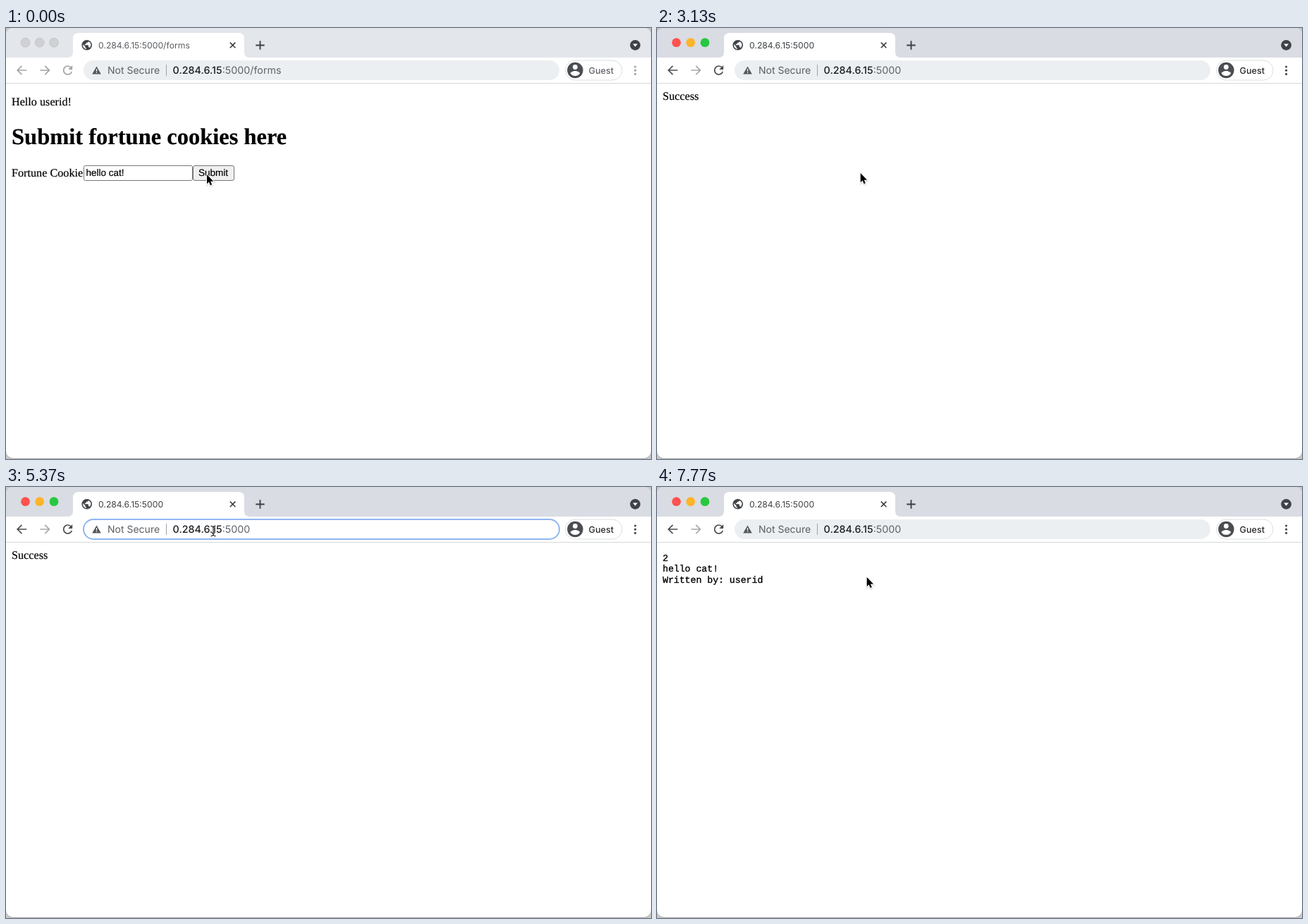
Animation, 915 px wide and 612 px high, one loop 8000 ms. Source, as an HTML page:

```html
<!DOCTYPE html>
<html lang="en">
<head>
<meta charset="utf-8">
<title>Fortune form</title>
<style>
  html, body { margin: 0; width: 100%; height: 100%; overflow: hidden; background: #c8c8c8; }
  svg {
    display: block; width: 915px; height: 612px;
    --strip: #d9dce3; --ink: #4a4d51; --label: #26282b; --title: #3c4043;
    --red: #ff524f; --yellow: #feb429; --green: #27c840; --rim: none;
  }
  svg.inactive {
    --strip: #e3e6eb; --ink: #a2a4a7; --label: #5f6368; --title: #5a5d61;
    --red: #cfd0d3; --yellow: #cfd0d3; --green: #cfd0d3; --rim: #bfc0c3;
  }
  text { white-space: pre; text-rendering: geometricPrecision; }
  .ui { font: 14px Inter, Roboto, sans-serif; }
  .small { font-size: 12.2px; }
  .url { font-size: 14.3px; }
  .guest { font-size: 12.6px; font-weight: 500; }
  .page { font: 16.2px "Liberation Serif", serif; }
  .page text { stroke: #000; stroke-width: .2; }
  .page .heading { font-size: 32.5px; font-weight: bold; }
  .page .control { font: 13.5px "Liberation Sans", sans-serif; }
  .mono { font: 13.18px "Liberation Mono", monospace; stroke: #000; stroke-width: .35; }
  .icon { fill: none; stroke: var(--ink); stroke-width: 1.7; }
</style>
</head>
<body>
<svg id="stage" viewBox="0 0 915 612">
  <defs>
    <clipPath id="corners"><rect width="915" height="611" rx="10"/></clipPath>
    <path id="arrowShape" d="M0 0V13.2L2.9 10.5L4.9 15.2L7.1 14.3L5.1 9.7H9.3Z"/>
    <path id="beamShape" d="M-3.5 -7.2Q0 -7.2 0 -5.2Q0 -7.2 3.5 -7.2M0 -5.5V5.5M-3.5 7.2Q0 7.2 0 5.2Q0 7.2 3.5 7.2M-2 3H2"/>
  </defs>
  <rect width="915" height="612" fill="#c8c8c8"/>
  <rect y="590" width="915" height="22" rx="10" fill="#a6a6a6"/>

  <g clip-path="url(#corners)">
    <rect width="915" height="612" fill="#fff"/>
    <rect width="915" height="42" fill="var(--strip)"/>

    <!-- Tab strip -->
    <g stroke="var(--rim)" stroke-width=".8">
      <circle cx="27.5" cy="20.7" r="6.4" fill="var(--red)"/>
      <circle cx="47.7" cy="20.7" r="6.4" fill="var(--yellow)"/>
      <circle cx="68" cy="20.7" r="6.4" fill="var(--green)"/>
    </g>
    <path d="M87 42Q95 42 95 34V15Q95 7 103 7H330Q338 7 338 15V34Q338 42 346 42Z" fill="#fff"/>
    <g id="globe" transform="translate(114.7 24.3)">
      <circle r="7.3" fill="#3f4347"/>
      <path d="M-5.8 -1.2L-2.2 2.2V3.6L-.8 4.4V5.8Q-5.6 5.2 -5.8 -1.2ZM2.2 -5.4Q2.2 -3.6 .7 -3.6H-.7V-2.2L-1.5 -1.5H-2.9V0H1.5L2.2 .7V2.9H2.9Q4 2.9 4.3 3.9Q8 -2.6 2.2 -5.4Z" fill="#fff"/>
    </g>
    <circle id="spinner" r="6.3" fill="none" stroke="#6b7075" stroke-width="1.8" stroke-dasharray="26 14"/>
    <text id="title" class="ui small" x="131" y="28.5" fill="var(--title)"></text>
    <path d="M317.8 20.6l7.6 7.6m0-7.6l-7.6 7.6" stroke="#3c4043" stroke-width="1.6"/>
    <path d="M354.3 24.5h12.4m-6.2-6.2v12.4" stroke="#3c4043" stroke-width="1.9"/>
    <circle cx="892.6" cy="24.4" r="7.3" fill="#3f4347"/>
    <path d="M889.2 22.6h6.8l-3.4 4.2z" fill="#fff"/>

    <!-- Toolbar -->
    <path class="icon" d="M29.2 60H16.6M22.4 53.8L16.2 60L22.4 66.2"/>
    <path id="forward" class="icon" d="M48.4 60H61M55.2 53.8L61.4 60L55.2 66.2"/>
    <g id="reload">
      <path class="icon" d="M92.3 56.2A6 6 0 1 0 93.3 62"/>
      <path d="M94.2 53v6h-6z" fill="var(--ink)"/>
    </g>
    <path id="stop" class="icon" d="M82.8 55.3l9.4 9.4m0-9.4l-9.4 9.4"/>
    <rect id="bar" x="110" y="46" width="675" height="28" rx="14" stroke-width="2"/>
    <path d="M128.5 54.4L134.8 65.6H122.2Z" fill="#54575b"/>
    <path d="M128.5 58v3.8m0 1v1.3" stroke="#fff" stroke-width="1.3"/>
    <text class="ui" x="144" y="65.1" fill="#5b5e62">Not Secure</text>
    <path d="M227.5 52v16" stroke="#a0a3a7"/>
    <rect id="selection" x="236" y="51" width="111" height="18" fill="#b4d5fe"/>
    <text class="ui url" x="236.6" y="65.1" fill="#1c1d20"><tspan id="host" font-weight="500"></tspan><tspan id="path" fill="#5f6368"></tspan></text>
    <path id="caret" d="M294.5 51v18" stroke="#000"/>
    <rect x="793.5" y="46" width="80.5" height="28" rx="14" fill="#fff" stroke="#dcdee1"/>
    <circle cx="807.4" cy="60" r="11.2" fill="#4a4d51"/>
    <circle cx="807.4" cy="55.5" r="3.4" fill="#fff"/>
    <path d="M800.7 64.5C800.7 62.2 805.2 61 807.4 61S814.1 62.2 814.1 64.5Q811.7 68.1 807.4 68.1T800.7 64.5Z" fill="#fff"/>
    <text class="ui guest" x="826.5" y="65" fill="var(--label)">Guest</text>
    <g fill="var(--ink)">
      <circle cx="892.6" cy="55" r="1.6"/><circle cx="892.6" cy="60.2" r="1.6"/><circle cx="892.6" cy="65.4" r="1.6"/>
    </g>
    <rect y="78" width="915" height="1" fill="#d6d8db"/>

    <!-- Pages -->
    <g id="form" class="page">
      <text x="8" y="110">Hello userid!</text>
      <text class="heading" x="8" y="165">Submit fortune cookies here</text>
      <text x="8" y="211">Fortune Cookie</text>
      <rect x="110.5" y="195.5" width="154" height="21" rx="2" fill="#fff" stroke="#767676"/>
      <text class="control" x="113.5" y="210.4">hello cat!</text>
      <rect id="button" x="265.5" y="195.5" width="58" height="21" rx="2.5"/>
      <text class="control" x="273" y="210.4">Submit</text>
    </g>
    <g id="success" class="page"><text x="8" y="102">Success</text></g>
    <g id="fortune" class="mono">
      <text x="8" y="105"></text>
      <text x="8" y="120.3"></text>
      <text x="8" y="135.6"></text>
    </g>

    <g id="status">
      <path d="M0 589.5H300Q304 589.5 304 593.5V611H0Z" fill="#e4e6ea" stroke="#c6c9cd"/>
      <text id="statusText" class="ui small" x="8" y="604.5" fill="#5f6368"></text>
    </g>
  </g>

  <g id="arrow">
    <use href="#arrowShape" x=".3" y="1.2" fill="none" stroke="#000" stroke-opacity=".13" stroke-width="2.6"/>
    <use href="#arrowShape" stroke="#fff" stroke-width="1.8"/>
    <use href="#arrowShape"/>
  </g>
  <g id="beam" fill="none">
    <use href="#beamShape" stroke="#fff" stroke-opacity=".8" stroke-width="2.4"/>
    <use href="#beamShape" stroke="#000" stroke-width="1"/>
  </g>
</svg>

<script>
const LOOP = 8000;
const HOST = "0.284.6.15";
const PORT = ":5000";
const POINTER = [ // time, x, y
  [0, 285, 208], [1570, 285, 208], [1770, 282, 210], [1880, 283, 216], [2030, 288.7, 206],
  [3130, 288.7, 206], [3560, 93, 84], [3930, 280, 76], [4100, 294, 62.5],
  [6430, 294, 62.5], [6630, 297.7, 128], [LOOP, 297.7, 128]
];
const LOADS = [[2270, 2500], [5500, 5760], [7000, 7170], [7630, 7770]];

const $ = id => document.getElementById(id);
const within = (t, from, to) => t >= from && t < to;
const ramp = (t, from, to) => Math.min(1, Math.max(0, (t - from) / (to - from)));
const show = (id, visible) => { $(id).style.display = visible ? "" : "none"; };
const paint = (id, fill, stroke) => {
  $(id).setAttribute("fill", fill);
  $(id).setAttribute("stroke", stroke);
};
const move = (id, x, y, angle = 0) =>
  $(id).setAttribute("transform", `translate(${x} ${y}) rotate(${angle})`);

function pointerAt(t) {
  const i = POINTER.findIndex(key => key[0] > t);
  const [t0, x0, y0] = POINTER[i - 1];
  const [t1, x1, y1] = POINTER[i];
  const u = ramp(t, t0, t1);
  const ease = u * u * (3 - 2 * u);
  return [x0 + (x1 - x0) * ease, y0 + (y1 - y0) * ease];
}

function drawToolbar(t, onForm) {
  const loading = LOADS.some(([from, to]) => within(t, from, to));
  const focused = within(t, 4230, 5500);
  const hovered = within(t, 4000, 4230);
  const path = PORT + (onForm ? "/forms" : "");

  $("stage").classList.toggle("inactive", t < 30);
  $("title").textContent = HOST + path;
  $("path").textContent = path;
  $("forward").style.stroke = onForm ? "" : "#a6a8ab";
  paint("bar", focused ? "#fff" : hovered ? "#e3e5e6" : "#eceff1", focused ? "#8fb6f1" : "none");
  show("selection", within(t, 4300, 4870));
  show("caret", within(t, 4870, 5370));
  show("globe", !loading);
  show("spinner", loading);
  show("reload", !loading);
  show("stop", loading);
  move("spinner", 114.7, 24.3, -t * 0.36);
}

function drawPage(t, onForm) {
  const lines = t < 7730
    ? ["0", "undefined", "Written by: Tester"]
    : ["2", "hello cat!", "Written by: userid"];
  show("form", onForm);
  show("success", !onForm && t < 5730);
  show("fortune", t >= 5730);
  [...$("fortune").children].forEach((line, i) => { line.textContent = lines[i]; });

  if (within(t, 2200, 2300)) paint("button", "#f5f5f5", "#8d8d8d");
  else if (t >= 1570) paint("button", "#e0e0e0", "#4f4f4f");
  else paint("button", "#efefef", "#767676");

  $("status").style.opacity = ramp(t, 2270, 2400) * (1 - ramp(t, 2780, 2930));
}

function drawPointer(t) {
  const [x, y] = pointerAt(t);
  const overBar = t >= 3930 && y < 74;
  show("arrow", !overBar);
  show("beam", overBar);
  move(overBar ? "beam" : "arrow", x, y);
}

const start = performance.now();

function frame() {
  const t = (performance.now() - start) % LOOP;
  const onForm = t < 2430;
  drawToolbar(t, onForm);
  drawPage(t, onForm);
  drawPointer(t);
  requestAnimationFrame(frame);
}

$("host").textContent = HOST;
$("statusText").textContent = `Waiting for ${HOST}...`;
frame();
</script>
</body>
</html>
```
